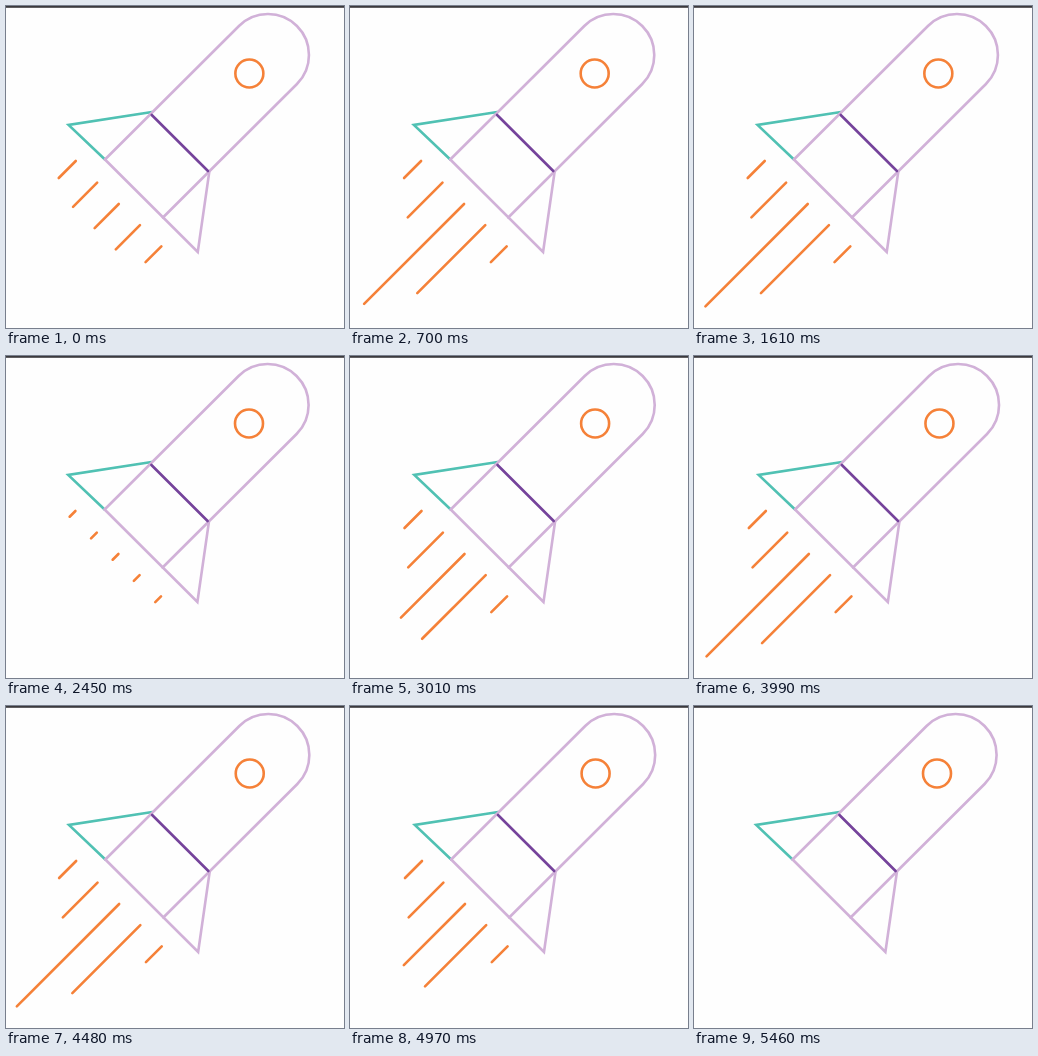
These frames come from a looping animation (338x322 px, 5530 ms). An HTML page:

```html
<!DOCTYPE html>
<html lang="en">
<head>
<meta charset="utf-8">
<title>Rocket</title>
<style>
  html, body { margin: 0; width: 100%; height: 100%; overflow: hidden; background: #fefefe; }
  svg { display: block; width: 338px; height: 322px; }
  #rocket { fill: none; stroke-width: 2.6; stroke-linecap: round; stroke-linejoin: round; }
  .hull { stroke: #d1b1d8; }
  .fin { stroke: #50c1b3; }
  .band { stroke: #75439b; }
  .hot { stroke: #f58138; }
</style>
</head>
<body>
<svg viewBox="0 0 338 322">
  <rect width="338" height="1.8" fill="#3b3a3d"/>
  <g id="rocket">
    <path class="fin" stroke-linejoin="miter" d="M146 106 L62.6 119 L99 153.5"/>
    <path class="hull" d="M99 153.5 L233 20 A41 41 0 0 1 291 78 L157 211.5"/>
    <path class="hull" stroke-linejoin="miter" d="M99 153.5 L191.8 246 L203.3 166"/>
    <path class="band" d="M145.8 109 L202 165"/>
    <circle class="hot" cx="243.4" cy="67.5" r="14"/>
    <g id="flames" class="hot"></g>
  </g>
</svg>
<script>
  const STEP = 70, STEPS = 79;
  const rocket = document.getElementById('rocket');
  const flames = document.getElementById('flames');

  // Each flame: start x, start y, full reach along each axis
  const trails = [
    [69.8, 155, 17], [91.2, 176.7, 34.7], [112.8, 198, 102.3],
    [134, 219.2, 68], [155.4, 240.4, 15.8]
  ].map(([x, y, reach]) => {
    const el = document.createElementNS('http://www.w3.org/2000/svg', 'path');
    flames.appendChild(el);
    return { el, x, y, reach };
  });

  // cubic-bezier(.25, .1, .25, 1)
  function ease(u) {
    if (u <= 0) return 0;
    if (u >= 1) return 1;
    const curve = (s, a, b) => 3 * s * (1 - s) * (1 - s) * a + 3 * s * s * (1 - s) * b + s * s * s;
    let lo = 0, hi = 1;
    for (let i = 0; i < 24; i++) {
      const mid = (lo + hi) / 2;
      if (curve(mid, .25, .25) < u) lo = mid; else hi = mid;
    }
    return curve(lo, .1, 1);
  }

  // Two bursts: rise start, rise end, fall start, fall end
  const bursts = [[-235, 1165, 1240, 2540], [2540, 3920, 4120, 5385]];

  function thrust(t) {
    const [a, b, c, d] = t < 2540 ? bursts[0] : bursts[1];
    return 108 * Math.min(ease((t - a) / (b - a)), ease((d - t) / (d - c)));
  }

  function shake(n) {
    const phase = n <= 35 ? (35 - n) * .4875 : (78 - n) * .493;
    return 2.6 * ease(2 * Math.abs(phase - Math.round(phase)));
  }

  function draw(now) {
    const n = Math.floor(now / STEP) % STEPS;
    const length = thrust(n * STEP);
    rocket.setAttribute('transform', `translate(${(shake(n) - .4).toFixed(2)} 0)`);
    flames.setAttribute('visibility', length < .5 ? 'hidden' : 'visible');
    for (const { el, x, y, reach } of trails) {
      const r = Math.min(length, reach);
      el.setAttribute('d', `M${x} ${y} L${x - r} ${y + r}`);
    }
  }

  const start = performance.now();
  function loop() {
    draw(performance.now() - start);
    requestAnimationFrame(loop);
  }
  loop();
</script>
</body>
</html>
```
